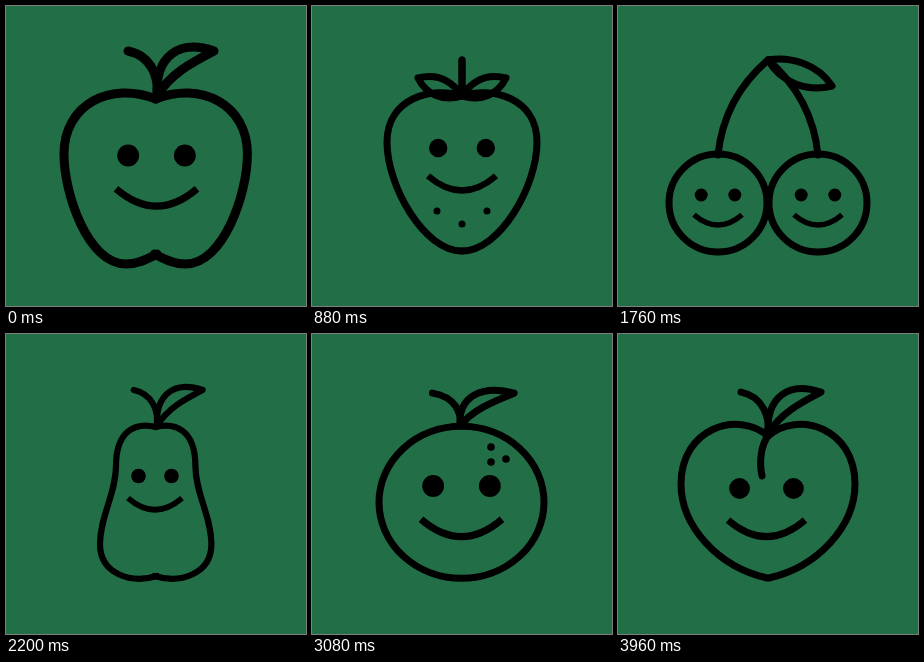
These frames come from a looping animation (300 by 300 pixels, 4.4 s). An HTML page:

```html
<!DOCTYPE html>
<html lang="en">
<head>
<meta charset="utf-8">
<title>Smiling fruit and vegetables</title>
<style>
  html, body { margin: 0; width: 100%; height: 100%; overflow: hidden; background: #226e47; }
  svg { display: block; width: 300px; height: 300px; overflow: hidden; }
  #strip { animation: flip 4.4s steps(10) infinite; }
  @keyframes flip { to { transform: translateX(-3000px); } }
  path, ellipse {
    fill: none; stroke: #000; stroke-linecap: round; stroke-linejoin: round;
    vector-effect: non-scaling-stroke;
  }
  .butt { stroke-linecap: butt; }
  .sharp { stroke-linejoin: miter; }
</style>
</head>
<body>
<svg viewBox="0 0 300 300"><g id="strip"></g></svg>
<script>
const dot = (x, y, r) => `<circle cx="${x}" cy="${y}" r="${r}"/>`;
const line = (w, d, cls = '') => `<path class="${cls}" stroke-width="${w}" d="${d}"/>`;
const oval = (w, x, y, rx, ry = rx) =>
  `<ellipse stroke-width="${w}" cx="${x}" cy="${y}" rx="${rx}" ry="${ry}"/>`;

// Draws a left half and its reflection about x = cx.
const mirror = (cx, w, half, cls) => {
  const side = line(w, half, cls);
  return side + `<g transform="translate(${2 * cx}) scale(-1 1)">${side}</g>`;
};

// Every face follows from the half width of its smile.
const face = (x, y, half, gap = 0.7 * half, drop = 0.82 * half) =>
  dot(x - gap, y, 0.27 * half) + dot(x + gap, y, 0.27 * half) +
  line(3 + 0.1 * half, `M${x - half} ${y + drop}q${half} ${0.86 * half} ${2 * half} 0`, 'butt');

// Curved stem with one leaf to its right.
const sprout = (x, y, w, sx = 1, sy = sx) =>
  `<g transform="translate(${x} ${y}) scale(${sx} ${sy})">` +
  line(w, 'M0 0C2 -18 -5 -40 -29 -45M0 0C-2 -40 22 -57 57 -45C34 -33 13 -22 0 0') + '</g>';

const apple =
  mirror(149.7, 9, 'M150 93C105 75 58 98 58 148C58 188 82 258 120 258C133 258 143 252 151 248') +
  sprout(151, 90, 9) + face(150.5, 149.5, 40.5);

const avocado =
  mirror(149.7, 6.5, 'M150 76C124 76 87 153 87 186C87 217 118 243 150 243') +
  mirror(150, 6.2, 'M150 148.5C132 148.5 122.5 170 122.5 188C122.5 208 134 219.5 150 219.5') +
  line(6, 'M151 76Q150 60 137 55') + face(150, 107, 23, 13, 16);

const strawberry =
  mirror(150, 7, 'M150 90C120 80 75 92 75 136C75 180 112 245 150 245') +
  mirror(150, 7, 'M150 90V54M150 90C138 72 122 68 106 72C114 88 130 96 150 90') +
  face(150, 142, 34) + [-1, 0, 1].map(i => dot(150 + 25 * i, 218 - 13 * i * i, 3.5)).join('');

const carrot =
  mirror(149.5, 5.2, 'M150 96.5H144C129 97 119 108 119 122Q119 126 121 133L143 233Q146 246.5 150 246.5') +
  mirror(149, 5.5, 'M149 95V53M147 95C147 76 139 66 126 63') +
  line(5, 'M128 160H151M149 182H167M138 207H151') + face(150, 118.5, 17.5);

const cherries =
  [100, 200].map(x => oval(7, x, 197, 49) + face(x, 189, 24)).join('') +
  mirror(150, 7, 'M100 149C104 110 122 78 150 54') +
  line(7, 'M150 54C172 50 200 58 214 80C190 86 164 78 150 54');

const pear =
  mirror(149.7, 6.2, 'M150 93C130 88 110 96 110 132C110 160 94 182 94 210C94 240 125 250 151 242') +
  sprout(151, 92, 6.2, 0.8) + face(149, 142, 27, 16.5);

const tomato =
  mirror(150, 7, 'M150 96C120 82 70 96 70 158C70 210 106 244 150 244') +
  mirror(150, 7, 'M150 94Q134 102 118 118') +
  line(7, 'M150 94Q152 70 140 56') + face(150, 154, 40);

const orange =
  oval(7, 149.5, 168.3, 82.5, 76) + sprout(148, 92, 7, 0.95, 0.73) +
  dot(179, 113, 3.8) + dot(179, 128, 3.8) + dot(194, 125, 3.8) + face(149.5, 152, 40.5);

const broccoli =
  mirror(150, 8, `M150 40A41 41 0 0 0 110 72A39 39 0 0 0 70 121
    A40.5 40.5 0 0 0 58 148A40 40 0 0 0 98 187Q111 187 123 181Q134 189 150 189`, 'sharp') +
  mirror(149.5, 8, 'M110 187C120 212 123 235 126 259H150', 'sharp') +
  mirror(150, 4, 'M124 184L133 206L136 188', 'sharp butt') + face(150, 107.5, 39);

const peach =
  mirror(150, 7, 'M150 102C120 76 63 94 63 150C63 192 100 233 149 244') +
  line(7, 'M150 102C143 111 141 128 144 142') +
  sprout(150, 100, 7, 0.93) + face(148.5, 154.5, 38.5);

const cast = [apple, avocado, strawberry, carrot, cherries, pear, tomato, orange, broccoli, peach];
document.getElementById('strip').innerHTML =
  cast.map((art, i) => `<g transform="translate(${i * 300})">${art}</g>`).join('');
</script>
</body>
</html>
```
